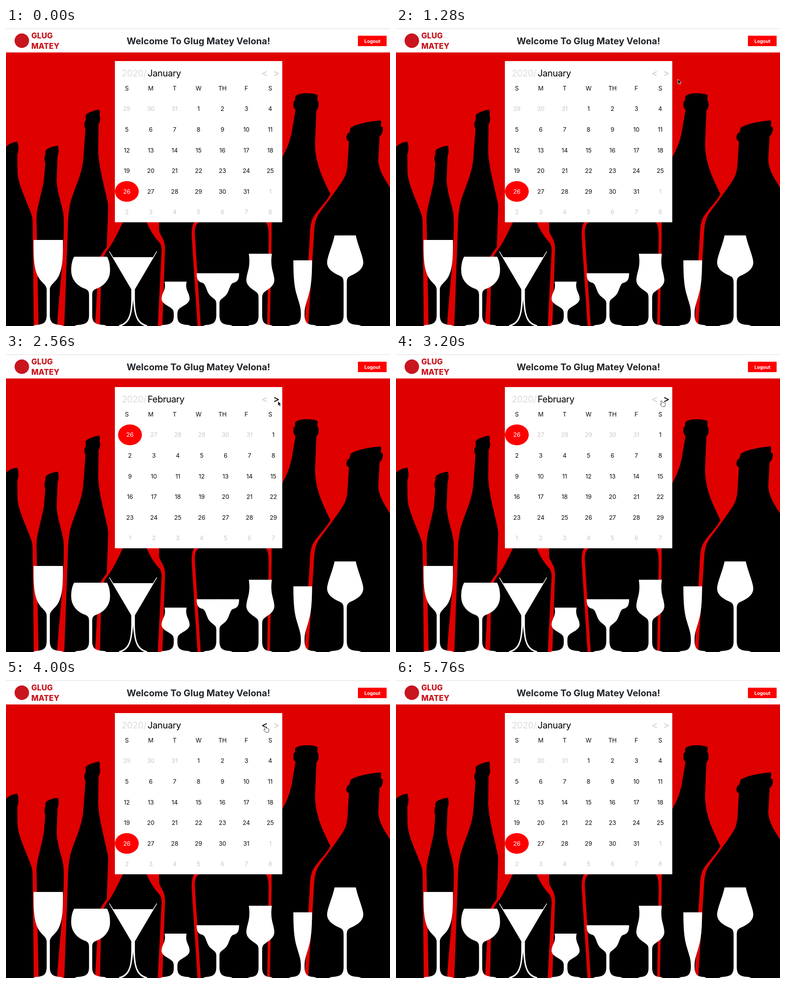
These frames come from a looping animation (850 by 658 pixels, 7040 ms). An HTML page:

```html
<!DOCTYPE html>
<html lang="en">
<head>
<meta charset="utf-8">
<title>Calendar</title>
<style>
  html, body { margin: 0; width: 100%; height: 100%; overflow: hidden; background: #fff; }
  svg { display: block; width: 850px; height: 658px; font-family: Inter, "Open Sans", sans-serif; }
  .title { font-size: 20.2px; font-weight: 700; fill: #212529; }
  .brand { font-size: 17px; font-weight: 800; fill: #c9151e; }
  .logout { font-size: 10.4px; font-weight: 700; fill: #fff; }
  .mid { text-anchor: middle; }
  .month { font-size: 20px; letter-spacing: -.4px; }
  .year { fill: #dcdcdc; }
  .nav { font-size: 21px; font-weight: 500; fill: #d2d2d2; }
  .nav.on { fill: #000; }
  .day { font-size: 13.3px; letter-spacing: -.15px; fill: #0c0c0c; }
  .other { fill: #c8c8c8; }
  .picked { fill: #fff; }
</style>
</head>
<body>
<svg viewBox="0 0 850 658">
  <defs>
    <clipPath id="window"><rect x="241" y="150" width="370" height="279"/></clipPath>
  </defs>

  <rect y="54" width="850" height="604" fill="#df0000"/>
  <g id="bottles">
    <path d="M0 262Q9 253 25 251Q29 263 27 272Q27 276 25 278L25.500 320C28 349 47 384 56 411Q59 419 59 434L61.500 658H0Z"/>
    <path d="M87 274Q88 268 95 265Q104 261 115 260Q118 272 115 280L114 285L112 338C114 365 121 380 126 405Q128 415 128 436C127 520 118 580 113 658H72L68 440Q67 420 68 412C70 393 82 352 84 335L87 298Q84 293 86 282Q88 280 87 274Z"/>
    <path d="M176 193Q181 185 206 180Q209 185 207 193Q210 200 207 208L205 212L204 275C207 315 218 350 223 376Q227 390 226 402L223 484C214 496 207 503 205 520L197 658H129L137 440Q137 413 142 388C150 357 168 325 171 290L176 223Q172 216 174 208L177 203Z"/>
    <path d="M259 428C250 448 240 468 229 485Q213 503 211 525L208 658H336L344 500Q346 482 340 474C328 461 319 447 311 428Z"/>
    <path d="M339 428V447C341 460 353 465 352 490L346 658H424L411 460Q410 436 417 428Z"/>
    <path d="M429 428Q417 433 418 455L431 658H578L581.500 465Q582 434 574 428Z"/>
    <path d="M640 153Q640 146 662 144Q686 144 690 149L689 159Q694 165 691 176L687 183L684 257C685 305 706 340 718 367C706 388 687 404 679 420Q674 430 673 450L661 658H584L588 460V428H600V300L611 286C626 261 632 238 635 215L641 181Q634 175 637 162L640 159Z"/>
    <path d="M760 231L763 220Q783 208 829 204Q832 208 829 217Q837 218 833 230Q831 237 827 238L824 293C826 316 838 333 850 352V658H669L682 450Q683 425 692 411C710 386 735 354 748 332Q755 320 756 300L759 250Q752 248 754 238Q755 233 760 231Z"/>
  </g>
  <g id="glasses" fill="#fff"></g>

  <rect width="850" height="54" fill="#fff"/>
  <rect y="1" width="850" height="1" fill="#dedede"/>
  <circle cx="35" cy="28" r="16" fill="#c9151e"/>
  <text class="brand" x="56" y="23">GLUG</text>
  <text class="brand" x="56" y="46">MATEY</text>
  <text class="title mid" x="426" y="35.500">Welcome To Glug Matey Velona!</text>
  <rect x="779" y="17" width="63.500" height="23" fill="red"/>
  <text class="logout mid" x="811" y="32.600">Logout</text>

  <rect x="241" y="73" width="370.500" height="356" fill="#fff"/>
  <text class="month year" x="256" y="107">2020/</text>
  <text class="month" id="month" x="313.500" y="107"></text>
  <text class="nav mid" id="prev" x="572.500" y="107.300">&lt;</text>
  <text class="nav mid" id="next" x="598.500" y="107.300">&gt;</text>
  <g id="week"></g>
  <g clip-path="url(#window)">
    <ellipse id="hover" rx="26.400" ry="22.900" fill="#f9a6a8"/>
    <g id="jan"></g>
    <g id="feb"></g>
  </g>

  <g id="cursor">
    <g id="ring" fill="none">
      <circle cx="2" cy="6" r="12.500" stroke="#fff" stroke-width="2.600"/>
      <circle cx="2" cy="6" r="12.300" stroke="#333" stroke-width="1"/>
    </g>
    <path id="arrow" d="M0 0V10.500L2.400 8.200L4 12L5.900 11.200L4.300 7.600H7.500Z" stroke="#fff" stroke-width=".8"/>
    <path id="hand" d="M-2 1Q-1 -1 .6 .6L2.600 4Q4 3 5 4.400Q6.500 3.800 7 5.200Q8.500 5 8.700 7L8 10.500L7 13H1.500L-3 8.500Q-3 6.500 -.5 7.500L.2 7.200Z" fill="#fff" stroke="#222" stroke-width=".9" stroke-linejoin="round"/>
  </g>
</svg>

<script>
const $ = id => document.getElementById(id);
const LOOP = 7040, TICK = 160;
const CARD = { x: 241, y: 155.7, w: 370, col: 52.9, row: 45.6 };
const cellX = c => CARD.x + (c + .5) * CARD.col;
const cellY = r => CARD.y + (r + .5) * CARD.row;

// Right half of each glass around its axis; the left half is mirrored.
const foot = w => `C4 650 10 654 ${w - 10} 655.500Q${w} 656 ${w} 660H-1Z`;
const glasses = [
  [93.5, 'M-1 468H32.500C33 510 31 532 23 548C16 562 4 566 3.500 577V635' + foot(34)],
  [187.3, 'M-1 505H36.500C42 515 43 526 43 535C43 558 26 571 14 575C6 578 3.500 581 3.500 590V635' + foot(36)],
  [281.3, 'M-1 506H44L52 493L53 494L4 577V600C5 632 9 650 31 656V659H28C9 652 3 640 0 600H-1Z'],
  [375.4, 'M-1 560H24.500C20 579 31 584 31 598C31 609 14 614 8 620C3.500 624 4 630 4 636' + foot(34)],
  [469, 'M-1 541.500H47C47 556 43 561 33 563C26 567 26 580 18 590C12 597 3.500 598 3.500 608V635' + foot(33)],
  [563, 'M-1 498.500H25.500C21 530 30 538 31 556C31 570 18 576 9 583C4 587 4 591 4 600V635' + foot(28)],
  [656.8, 'M-1 513H20.700C20.500 550 19 570 13 590C8 608 4 615 4 632' + foot(31)],
  [750.8, 'M-1 458H23.500C28 480 40 505 40 518C40 533 24 542 12 547C4 551 3.500 555 3.500 565V635' + foot(36)]
];
$('glasses').innerHTML = glasses.map(([x, d]) => [1, -1].map(s =>
  `<path transform="translate(${x}) scale(${s} 1)" d="${d}"/>`).join('')).join('');

const label = (x, y, text, kind = '') =>
  `<text class="day mid ${kind}" x="${x}" y="${y + 4.8}">${text}</text>`;

$('week').innerHTML = ['S', 'M', 'T', 'W', 'TH', 'F', 'S'].map((d, i) => label(cellX(i), 133, d)).join('');

function page(month) {
  const lead = new Date(2020, month, 1).getDay();
  let out = '';
  for (let i = 0; i < 42; i++) {
    const date = new Date(2020, month, 1 - lead + i);
    const x = cellX(i % 7), y = cellY(Math.floor(i / 7));
    const picked = date.getMonth() === 0 && date.getDate() === 26;
    if (picked) out += `<ellipse cx="${x}" cy="${y}" rx="26.400" ry="22.900" fill="red"/>`;
    out += label(x, y, date.getDate(), picked ? 'picked' : date.getMonth() !== month ? 'other' : '');
  }
  return out;
}
$('jan').innerHTML = page(0);
$('feb').innerHTML = page(1);

// The CSS "ease" curve.
function ease(p) {
  let lo = 0, hi = 1, s = .5;
  for (let i = 0; i < 24; i++) {
    s = (lo + hi) / 2;
    const x = .75 * s * (1 - s) ** 2 + .75 * s * s * (1 - s) + s ** 3;
    if (x < p) lo = s; else hi = s;
  }
  return .3 * s * (1 - s) ** 2 + 3 * s * s * (1 - s) + s ** 3;
}

const FORWARD = 2313, BACK = 3676.5, SLIDE = 300;
const slide = (t, start) => t <= start ? 0 : t >= start + SLIDE ? 1 : ease((t - start) / SLIDE);

// Pointer path: time, x, y.
const route = [
  [640, 700, 170], [1280, 624, 113], [1920, 602, 104], [2880, 602, 104], [3520, 573.5, 102.5],
  [4000, 573.5, 102.5], [4480, 574.5, 178.5], [4800, 574.5, 178.5], [5440, 652, 168]
];
function pointer(t) {
  const i = route.findIndex(k => k[0] > t);
  if (i < 1) return (i ? route[route.length - 1] : route[0]).slice(1);
  const [a, b] = [route[i - 1], route[i]];
  const p = (t - a[0]) / (b[0] - a[0]), e = p * p * (3 - 2 * p);
  return [a[1] + (b[1] - a[1]) * e, a[2] + (b[2] - a[2]) * e];
}

const show = (id, on) => $(id).setAttribute('visibility', on ? 'inherit' : 'hidden');
const move = (id, x, y = 0) => $(id).setAttribute('transform', `translate(${x} ${y})`);

function draw(t) {
  const shift = slide(t, FORWARD) - slide(t, BACK);
  move('jan', -shift * CARD.w);
  move('feb', (1 - shift) * CARD.w);
  $('month').textContent = t > FORWARD && t < BACK ? 'February' : 'January';

  const visible = t >= 640 && t < 5760;
  const [x, y] = pointer(t);
  const over = cx => visible && Math.abs(x - cx) < 11 && y > 88 && y < 112;
  const onPrev = over(572.5), onNext = over(598.5);
  $('prev').classList.toggle('on', onPrev);
  $('next').classList.toggle('on', onNext);

  const c = Math.floor((x - CARD.x) / CARD.col), r = Math.floor((y - CARD.y) / CARD.row);
  const onDay = visible && c >= 0 && c < 7 && r >= 0 && r < 6;
  show('hover', onDay);
  move('hover', cellX(c), cellY(r));

  const hand = (onPrev || onNext || onDay) && !(t > FORWARD && t < 2800);
  show('cursor', visible);
  move('cursor', x, y);
  show('arrow', visible && !hand);
  show('hand', visible && hand);
  show('ring', t === 2240 || t === 3520);
}

function frame(now) {
  draw(Math.floor(now % LOOP / TICK) * TICK);
  requestAnimationFrame(frame);
}
draw(0);
requestAnimationFrame(frame);
</script>
</body>
</html>
```
